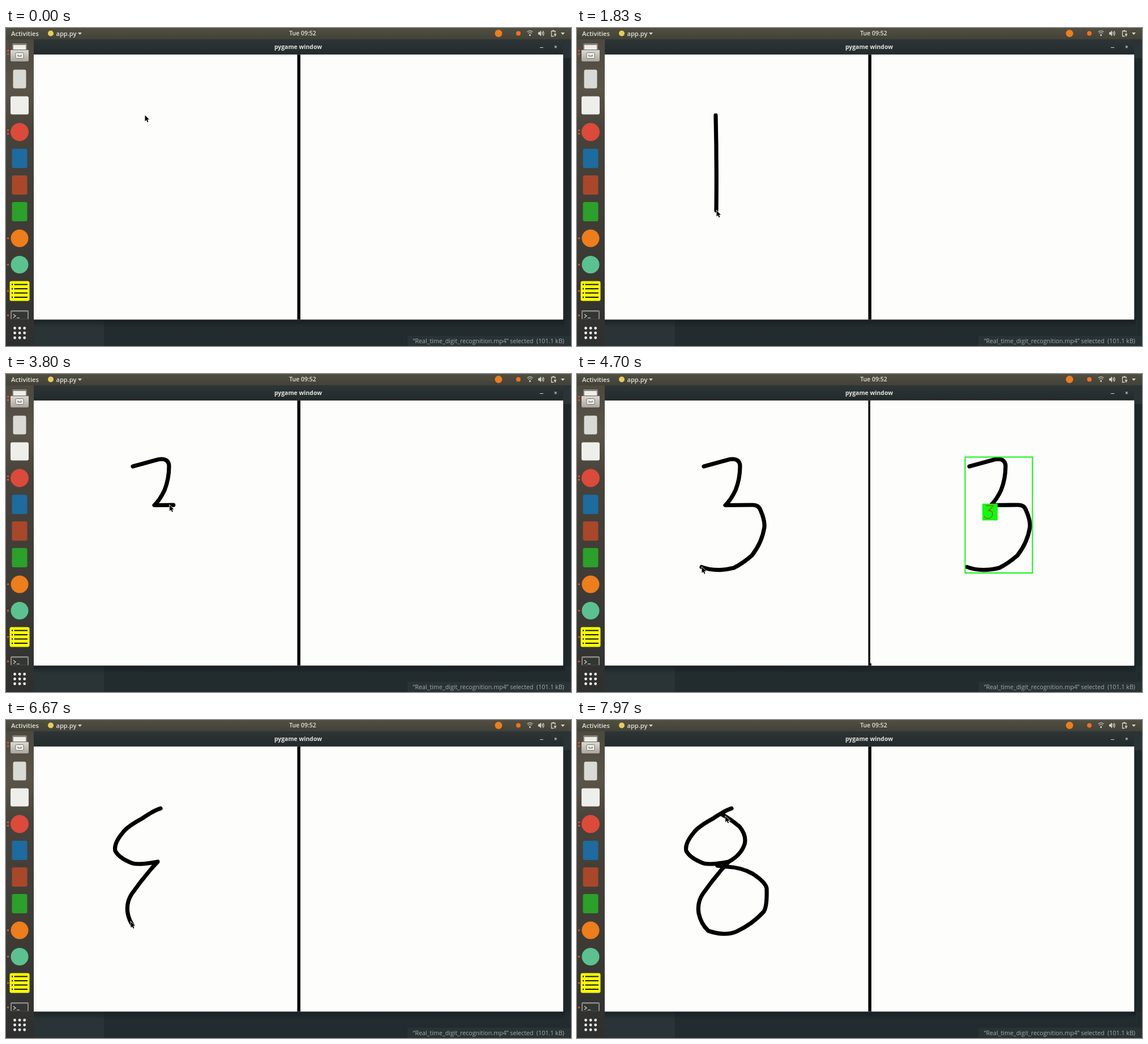
Animation of 998x561 px, one loop 8000 ms. Source, as an HTML page:

```html
<!DOCTYPE html>
<html lang="en">
<head>
<meta charset="utf-8">
<title>Digit recognition</title>
<style>
  html, body { margin: 0; width: 100%; height: 100%; overflow: hidden; background: #222b2e; }
  svg { display: block; width: 998px; height: 561px; }
  text { font-family: "Open Sans", "Noto Sans", sans-serif; font-weight: 600; fill: #e4e2dc; }
  .ink { fill: none; stroke: #000; stroke-width: 7.2; stroke-linecap: round; stroke-linejoin: round; }
</style>
</head>
<body>
<svg viewBox="0 0 998 561">
  <defs>
    <linearGradient id="bar" x2="0" y2="1">
      <stop stop-color="#504f42"/><stop offset="1" stop-color="#424238"/>
    </linearGradient>
    <linearGradient id="dockFill" x2="0" y2="1">
      <stop stop-color="#4d493f"/><stop offset=".16" stop-color="#5a5348"/>
      <stop offset=".3" stop-color="#47423a"/><stop offset=".7" stop-color="#3d3a35"/>
      <stop offset="1" stop-color="#2d2f2e"/>
    </linearGradient>
    <linearGradient id="titleFill" x2="0" y2="1">
      <stop stop-color="#2d3537"/><stop offset="1" stop-color="#232a2c"/>
    </linearGradient>
    <linearGradient id="shade" x2="0" y2="1">
      <stop stop-color="#141b1d"/><stop offset="1" stop-color="#141b1d" stop-opacity="0"/>
    </linearGradient>
    <linearGradient id="cabinet" x2="0" y2="1">
      <stop stop-color="#dedbd5"/><stop offset="1" stop-color="#aaa69f"/>
    </linearGradient>
  </defs>

  <!-- desktop behind the window -->
  <rect width="998" height="561" fill="#222b2e"/>
  <rect x="984" y="20" width="14" height="33" fill="#2a3336"/>
  <rect x="984" y="53" width="14" height="462" fill="#1e272a"/>
  <rect x="49" y="514" width="124" height="47" fill="#2a3335"/>
  <rect x="49" y="514" width="938" height="14" fill="url(#shade)" opacity=".75"/>
  <path d="M709 561V546q0-3 3-3H998V561Z" fill="#293235"/>
  <text x="986" y="555.5" text-anchor="end" font-size="10.7" style="font-weight:400;fill:#a5abab">“Real_time_digit_recognition.mp4” selected&nbsp; (101.1 kB)</text>

  <!-- top bar -->
  <rect width="998" height="20" fill="url(#bar)"/>
  <text x="9" y="13.7" font-size="11.2">Activities</text>
  <circle cx="79" cy="9.5" r="5" fill="#e5cf55"/>
  <text x="88.5" y="13.7" font-size="11.1">app.py</text>
  <path d="M127 8h7l-3.5 4Z M980 8h7l-3.5 4Z" fill="#d8d6cf"/>
  <text x="524" y="13.2" text-anchor="middle" font-size="10.5">Tue 09:52</text>
  <circle cx="870" cy="9.5" r="6.5" fill="#ee7d1b"/>
  <circle cx="905" cy="9.5" r="4" fill="#f37021"/>
  <g fill="none" stroke="#d8d6cf" stroke-width="1.3">
    <path d="M920.5 7q5-4 10 0M922.3 9.5q3.2-2.6 6.4 0" opacity=".75"/>
    <path d="M925.5 11v3" stroke-width="2.4"/>
    <path d="M946.5 7q2 2.5 0 5M948.5 5.5q3 4 0 8"/>
    <path d="M970 8V5.5h-6.5v9h4M965.5 4.5h2.5M968 12h4M969 9.5v2M971 9.5v2M970 12v3"/>
  </g>
  <path d="M940 7.5h2l3-3v10l-3-3h-2Z" fill="#d8d6cf"/>

  <!-- window -->
  <path d="M49 20H980q4 0 4 4V47H49Z" fill="url(#titleFill)"/>
  <rect x="49" y="45.5" width="935" height="1.5" fill="#151b1d"/>
  <text x="516" y="37.3" text-anchor="middle" font-size="10.4" style="font-weight:700">pygame window</text>
  <path d="M943 34.5h6M969 31.5l3.600 3.600m0-3.600l-3.600 3.600" stroke="#d5d7d6" stroke-width="1.1"/>
  <rect x="49" y="46.7" width="935.2" height="467.7" fill="#fdfdfc"/>
  <rect x="514.5" y="46.7" width="5.5" height="467.7"/>

  <!-- recognition result -->
  <g id="result">
    <rect x="518" y="46.7" width="466.2" height="467.7" fill="#fdfdfc"/>
    <rect x="517" y="510.5" width="3" height="4"/>
    <path id="copy" class="ink" transform="translate(469)"/>
    <rect id="bounds" fill="none" stroke="#14f014" stroke-width="2"/>
    <g id="label">
      <rect width="27" height="29.5" fill="#10fa10"/>
      <path id="digit" fill="none" stroke="#a05a08" stroke-width="1.4"/>
    </g>
  </g>
  <path id="ink" class="ink"/>
  <path id="cursor" d="M0 0V10.500L2.500 8.300L4.300 12.200L6 11.400L4.300 7.600H7.600Z" stroke="#fff" stroke-width="1.3" paint-order="stroke"/>

  <!-- dock -->
  <rect y="20" width="49" height="541" fill="url(#dockFill)"/>
  <g id="dock"></g>
  <path d="M11 39V29q0-2 2-2H35q2 0 2 2V39Z" fill="#85817a"/>
  <rect x="13" y="30" width="22" height="9" fill="#efede8"/>
  <rect x="8" y="38" width="32" height="21" rx="2.5" fill="url(#cabinet)"/>
  <path d="M8.500 38.500h31" stroke="#6b6760"/>
  <rect x="17" y="43.500" width="14" height="10" rx="1.500" fill="#f3f1ed" stroke="#77736c"/>
  <path d="M21 47v2.500h6V47" fill="none" stroke="#77736c" stroke-width="1.3"/>
  <path d="M14.500 452.500H38M14.500 460H38M14.500 467.500H38M14.500 475H38" stroke="#15150a" stroke-width="2.2"/>
  <path d="M10 452.500h2M10 460h2M10 467.500h2M10 475h2" stroke="#15150a" stroke-width="2.5"/>
  <path d="M8 513.500V500q0-2 2-2H38q2 0 2 2V513.500Z" fill="#8b8b86"/>
  <rect x="10" y="500.500" width="28" height="13" fill="#333733"/>
  <path d="M13 505l4 3-4 3M19 511.500h5" fill="none" stroke="#d9dad5" stroke-width="1.2"/>
</svg>
<script>
const LOOP = 8000, LAG = 7;
const $ = id => document.getElementById(id);
const svgNode = (tag, attrs, parent) => {
  const el = document.createElementNS('http://www.w3.org/2000/svg', tag);
  for (const k in attrs) el.setAttribute(k, attrs[k]);
  return parent.appendChild(el);
};

// Dock tiles: [centre y, colour, width, height]; a width alone makes a disc.
const dock = $('dock');
[[90, '#d9d9d5', 23, 33], [136.5, '#eeeeeb', 32, 32], [183.5, '#db4a3b', 32],
 [230, '#1d6b9f', 27, 34], [277, '#a9472a', 27, 34], [324, '#2ba02a', 27, 34],
 [371, '#ee7d1b', 31], [417.5, '#5cc190', 31], [464, '#f8fb05', 35, 35]
].forEach(([y, fill, w, h]) => h
  ? svgNode('rect', {x: 24 - w / 2, y: y - h / 2, width: w, height: h, rx: 3, fill}, dock)
  : svgNode('circle', {cx: 24, cy: y, r: w / 2, fill}, dock));
for (const cy of [40, 46, 180.5, 186.5, 371, 417.5, 464, 507])
  svgNode('circle', {cx: 3.5, cy, r: 1.8, fill: '#d9532f'}, dock);
for (let i = 0; i < 9; i++)
  svgNode('circle', {cx: 15.5 + i % 3 * 8.6, cy: 529.5 + Math.floor(i / 3) * 8.5, r: 2.4, fill: '#f4f3f0'}, dock);

// Each stroke: pen down, drawing progress, result shown, cleared, cursor settled again.
const strokes = [
  {
    d: 'M245 154Q247 240 246 322',
    down: 1200, keys: [[1370, 0], [1830, 1]], shown: 2100, clear: 2470, settle: 2800,
    box: [709, 149, 12, 178], digit: 'M10 8L16 3.5L13 26'
  },
  {
    d: 'M224 163L270 150.5Q287 148 288 162Q288 185 280 205Q272 222 262 231.5' +
       'L310 231Q321 231 324 240Q332 258 331 270Q327 297 309 320Q293 334 277 342Q245 350 220 340.5',
    down: 3100, keys: [[3270, 0], [4430, 1]], shown: 4700, clear: 5000, settle: 5470,
    box: [685.5, 146.5, 119, 204.5],
    digit: 'M6 3.5H19.5L11 12.5Q18.5 12 18 18.5Q17 26 9.5 26Q4 26 3.5 21.5'
  },
  {
    d: 'M273 156Q260 160 240 174Q214 188 206 199Q190 218 193 231Q200 244 224 253Q238 256 268 250' +
       'L257 262Q238 284 222 307Q212 322 215 341Q219 360 232 372Q262 382 282 373Q310 360 330 338' +
       'Q336 328 335 297Q333 286 310 271Q290 260 266 259L248 257L268 250' +
       'Q290 238 296 219Q300 204 287 188Q270 174 255 166L250 163',
    down: 5670, keys: [[5830, 0], [5900, .054], [7400, .818], [LOOP, 1]],
    shown: Infinity, clear: Infinity
  }
];
for (const s of strokes) {
  s.path = document.createElementNS('http://www.w3.org/2000/svg', 'path');
  s.path.setAttribute('d', s.d);
  s.total = s.path.getTotalLength();
}

function progress(keys, t) {
  if (t <= keys[0][0]) return 0;
  for (let i = 1; i < keys.length; i++) {
    const [t0, p0] = keys[i - 1], [t1, p1] = keys[i];
    if (t < t1) return p0 + (p1 - p0) * (t - t0) / (t1 - t0);
  }
  return 1;
}

function cursorAt(s, prev, t, length) {
  const start = s.path.getPointAtLength(0);
  if (prev && t < prev.settle) {
    const from = prev.path.getPointAtLength(prev.total);
    const left = (1 - (t - prev.clear) / (prev.settle - prev.clear)) ** 2.6;
    return {x: start.x + (from.x - start.x) * left, y: start.y + (from.y - start.y) * left};
  }
  const drawing = t < s.keys[s.keys.length - 1][0];
  return s.path.getPointAtLength(Math.max(0, length - (drawing ? LAG : 0)));
}

function render(t) {
  const i = strokes.findIndex(s => t < s.clear), s = strokes[i];
  const length = progress(s.keys, t) * s.total;
  const ink = $('ink'), shown = t >= s.shown;
  ink.setAttribute('d', s.d);
  ink.setAttribute('stroke-dasharray', `${Math.max(.01, length)} 9999`);
  ink.style.display = t >= s.down ? '' : 'none';
  const tip = cursorAt(s, strokes[i - 1], t, length);
  $('cursor').setAttribute('transform', `translate(${tip.x + .5} ${tip.y})`);

  $('result').style.display = shown ? '' : 'none';
  if (shown) {
    const [x, y, w, h] = s.box;
    $('copy').setAttribute('d', s.d);
    Object.entries({x, y, width: w, height: h}).forEach(([k, v]) => $('bounds').setAttribute(k, v));
    $('label').setAttribute('transform', `translate(${x + w / 2 - 29} ${y + h / 2 - 20})`);
    $('digit').setAttribute('d', s.digit);
  }
}

const begin = performance.now();
function tick() {
  render((performance.now() - begin) % LOOP);
  requestAnimationFrame(tick);
}
tick();
</script>
</body>
</html>
```
